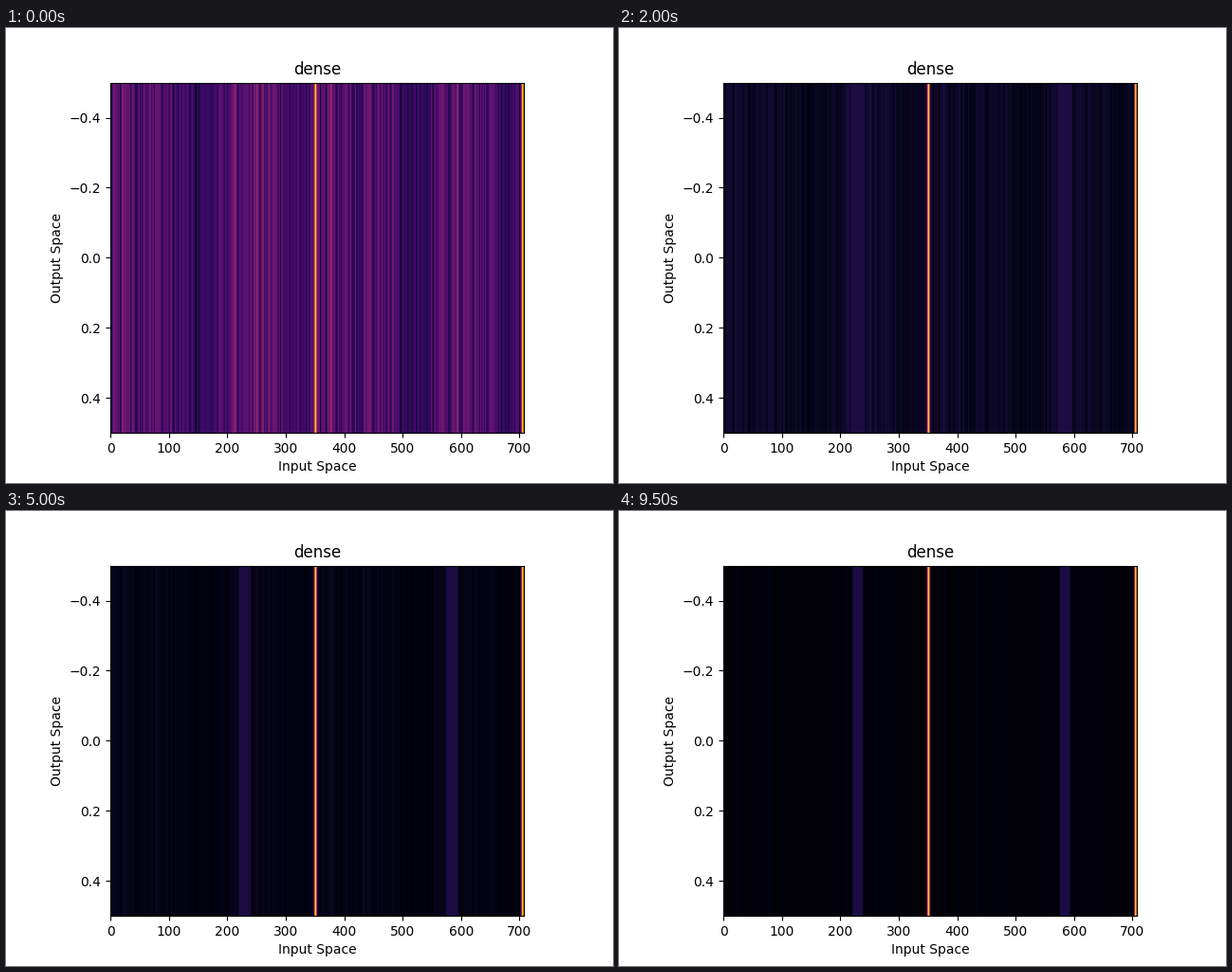
Animation of 640x480 px, one loop 10000 ms. Source, as a matplotlib script:

```python
import numpy as np
import matplotlib.pyplot as plt
from matplotlib.animation import FuncAnimation

COLUMNS = 708
HALF = COLUMNS // 2
FRAMES, INTERVAL = 20, 500

x = np.arange(COLUMNS)
phase = x % HALF  # both halves of the input share the same features


def bump(center, width):
    return np.exp(-((phase - center) / width) ** 2 / 2)


def plateau(center, half_width, soft):
    return np.clip((half_width + soft - abs(phase - center)) / soft, 0, 1)


# Fixed stripes: an even tone broken by dark lines and a few bright ones
rng = np.random.default_rng(12)
stripes = np.repeat(rng.random(HALF), 2)
grain = 1.05 - .75 * stripes ** 3 + .4 * (stripes < .015)
zone = 1 - .35 * bump(155, 22) - .35 * bump(322, 16)
peak = np.maximum(bump(350, 1.6), bump(-4, 1.6) * (x > HALF))


def weights(frame):
    t = frame * INTERVAL / 1000
    level = .115 * np.exp(-t / 5.5) + .175 * np.exp(-t / .5)
    jitter = np.random.default_rng(frame).normal(1, .06, COLUMNS)
    noise = np.maximum(level * zone * grain * jitter, .013)

    band = .115 * plateau(229, 6 + 8 * np.exp(-t / 5), 4)
    lines = .09 * np.exp(-t / 12) * (plateau(25, 1, 2) + plateau(78, 1, 2))
    return np.maximum.reduce([noise, band, lines, .95 * peak])[None, :]


fig, ax = plt.subplots(figsize=(6.4, 4.8), dpi=100)
image = ax.imshow(weights(0), cmap="inferno", vmin=0, vmax=1, aspect=600)
ax.set_title("dense")
ax.set_xlabel("Input Space")
ax.set_ylabel("Output Space")


def update(frame):
    image.set_data(weights(frame))
    return [image]


anim = FuncAnimation(fig, update, frames=FRAMES, interval=INTERVAL,
                     repeat=True, repeat_delay=0)
plt.show()
```
